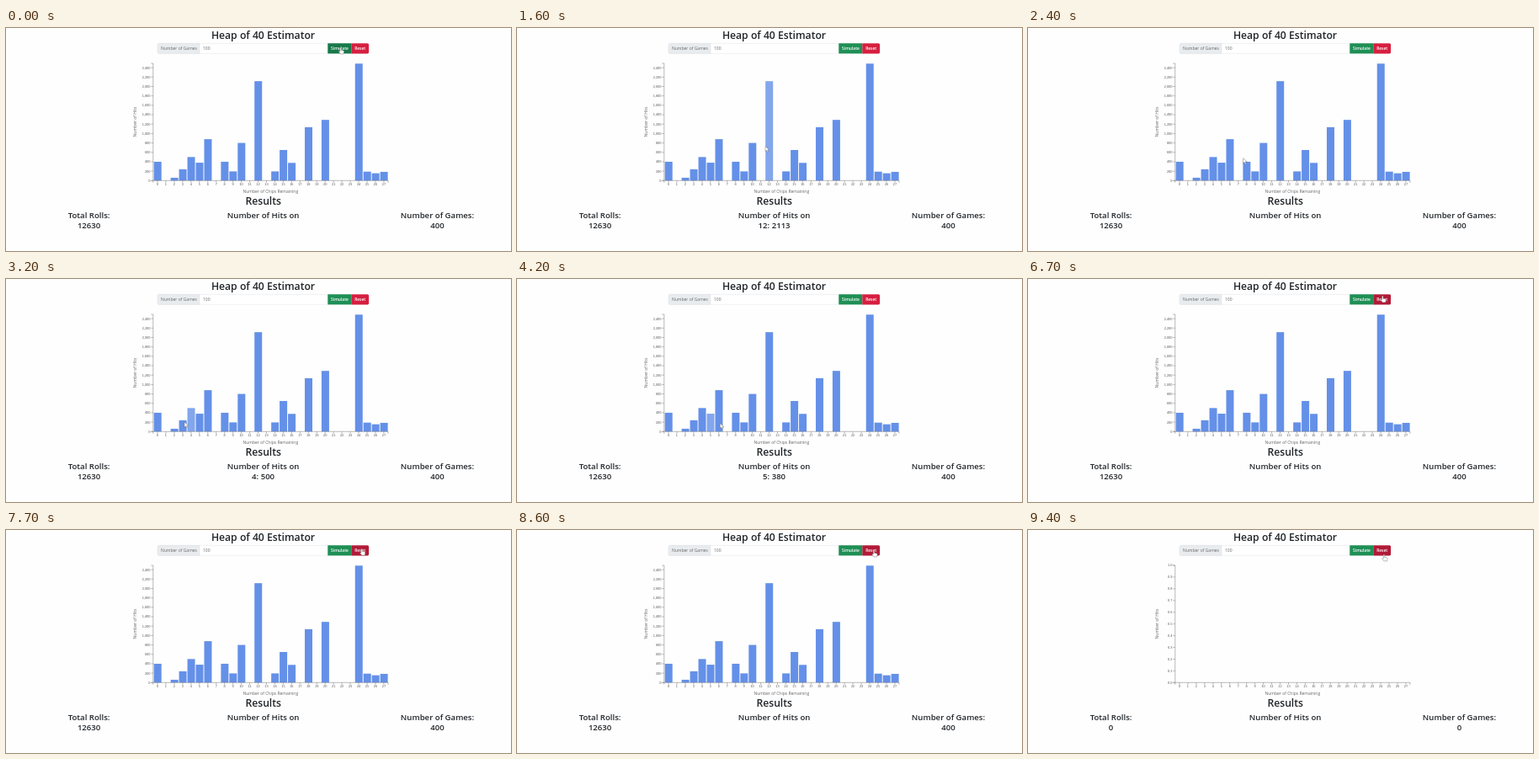
Recreate the animation shown at these times as an HTML page. Size 600 by 265 pixels, loop 9.5 s.

```html
<!DOCTYPE html>
<html lang="en">
<head>
<meta charset="utf-8">
<title>Dice chart</title>
<style>
  html, body { margin: 0; width: 100%; height: 100%; overflow: hidden; background: #fefefe; }
  svg { display: block; width: 600px; height: 265px; font-family: "Open Sans", "Noto Sans", sans-serif; }
  text { text-anchor: middle; fill: #212529; }
  .h2 { font-size: 12.2px; font-weight: 600; }
  .h4 { font-size: 9.6px; font-weight: 600; }
  .form { font-size: 5px; text-anchor: start; fill: #666; }
  .btn { font-size: 4.9px; font-weight: 600; fill: #fff; }
  .label { font-size: 5px; fill: #666; }
  .tick text { font: 3.9px "Liberation Sans", sans-serif; fill: #555; }
  .tick .y { text-anchor: end; }
  .axis { fill: none; stroke: #666; stroke-width: .45; }
  .bar { fill: #6490e8; }
  .bar.on { fill: #83a6ec; }
  .field { stroke: #d8dce1; stroke-width: .4; }
  #simulate { fill: #1f8f55; }
  #simulate.on { fill: #17794a; }
  #reset { fill: #d61f40; }
  #reset.on { fill: #b21a38; }
  .cursor { fill: #fff; stroke: #666; stroke-width: .45; stroke-linejoin: round; }
</style>
</head>
<body>
<svg viewBox="0 0 600 265">
  <text class="h2" x="305.5" y="13">Heap of 40 Estimator</text>

  <rect class="field" x="180.2" y="18.4" width="202" height="11.9" rx="1.5" fill="#fff"/>
  <path class="field" d="M230 18.4h-48.3q-1.5 0-1.5 1.5v8.9q0 1.5 1.5 1.5h48.3z" fill="#e9ecef"/>
  <text class="form" x="184" y="26.2">Number of Games</text>
  <text class="form" x="234" y="26.2">100</text>
  <rect id="simulate" x="382.3" y="18.2" width="28" height="12.2"/>
  <path id="reset" d="M410.3 18.2h19.2q1.6 0 1.6 1.6v9q0 1.6-1.6 1.6h-19.2z"/>
  <text class="btn" x="396.5" y="26.2">Simulate</text>
  <text class="btn" x="420.7" y="26.2">Reset</text>

  <g id="bars"></g>
  <path class="axis" d="M172.3 42h2.5v139.3h-2.5M174.8 183.8v-2.5h279.2v2.5"/>
  <g class="tick" id="xTicks"></g>
  <g class="tick" id="fullTicks"></g>
  <g class="tick" id="emptyTicks"></g>
  <text class="label" x="314.3" y="195.6">Number of Chips Remaining</text>
  <text class="label" transform="translate(155.4 111.5) rotate(-90)">Number of Hits</text>

  <text class="h2" x="305.7" y="210.3">Results</text>
  <text class="h4" x="98.6" y="225.6">Total Rolls:</text>
  <text class="h4" x="98.6" y="238" id="rolls"></text>
  <text class="h4" x="305.6" y="225.6">Number of Hits on</text>
  <text class="h4" x="305.6" y="238" id="hit"></text>
  <text class="h4" x="512.5" y="225.6">Number of Games:</text>
  <text class="h4" x="512.5" y="238" id="games"></text>

  <path class="cursor" id="arrow" d="M0 0v6.2l1.5-1.4 1 2.3 1.1-.5-1-2.2h2z"/>
  <path class="cursor" id="hand" d="M-.7 .6q.7-1 1.4 0v2.6l2.6.6q.9.3.8 1.3l-.5 2.8h-3.7l-2.1-2.7q0-1 1.5-.3z"/>
</svg>
<script>
const LOOP = 9500, STEP = 100, RESET_AT = 8700;
const BASE = 181.3, TOP = 42, LEFT = 180, PITCH = 9.96, UNIT = 0.0559;

// Chart data: chips remaining -> hits
const hits = {
  0: 400, 2: 60, 3: 240, 4: 500, 5: 380, 6: 880, 8: 400, 9: 195, 10: 800, 12: 2113,
  14: 195, 15: 650, 16: 376, 18: 1135, 20: 1290, 24: 2486, 25: 190, 26: 155, 27: 185
};

// Pointer stops: time, x, y
const path = [
  [0, 397.5, 23], [900, 378, 125], [1500, 299, 139], [1900, 283, 145],
  [3200, 212, 170], [3700, 179, 171], [5000, 341, 172], [5800, 400, 183],
  [6200, 419, 120], [6500, 421, 19.5], [8600, 424, 24], [9400, 423, 29]
];

const $ = id => document.getElementById(id);

function add(parent, tag, attrs, text = "") {
  const el = document.createElementNS("http://www.w3.org/2000/svg", tag);
  for (const key in attrs) el.setAttribute(key, attrs[key]);
  el.textContent = text;
  parent.append(el);
  return el;
}

function yTick(group, y, text) {
  add(group, "path", { class: "axis", d: `M172.3 ${y}h2.5` });
  add(group, "text", { class: "y", x: 171.4, y: y + 1.4 }, text);
}

const bars = {};
for (let i = 0; i < 28; i++) {
  const x = LEFT + i * PITCH;
  add($("xTicks"), "path", { class: "axis", d: `M${x} ${BASE}v2.5` });
  add($("xTicks"), "text", { x, y: 187 }, i);
  if (hits[i]) {
    const height = hits[i] * UNIT;
    bars[i] = add($("bars"), "rect", { class: "bar", x: x - 4.3, y: BASE - height, width: 9, height });
  }
}
for (let v = 0; v <= 2400; v += 200) yTick($("fullTicks"), BASE - v * UNIT, v.toLocaleString("en-US"));
for (let i = 0; i <= 10; i++) yTick($("emptyTicks"), BASE - i * (BASE - TOP) / 10, (i / 10).toFixed(1));

function tipAt(time) {
  const next = path.findIndex(p => p[0] > time);
  if (next < 0) return path[path.length - 1].slice(1);
  const [t0, x0, y0] = path[next - 1], [t1, x1, y1] = path[next];
  const k = (time - t0) / (t1 - t0);
  return [x0 + (x1 - x0) * k, y0 + (y1 - y0) * k];
}

function barUnder(x, y) {
  const i = Math.round((x - LEFT) / PITCH);
  return hits[i] && y < BASE && y > BASE - hits[i] * UNIT ? i : -1;
}

const show = (el, on) => el.setAttribute("visibility", on ? "visible" : "hidden");

function draw(time) {
  const cleared = time >= RESET_AT;
  const [x, y] = tipAt(time);
  // Hover styling trails the pointer by one step
  const [hx, hy] = tipAt(Math.max(0, time - STEP));
  const hovered = cleared ? -1 : barUnder(hx, hy);
  const onForm = hy > 18.2 && hy < 30.4;
  const onSimulate = onForm && hx > 382.3 && hx < 410.3;
  const onReset = onForm && hx >= 410.3 && hx < 431.1;

  for (const i in bars) bars[i].classList.toggle("on", +i === hovered);
  $("simulate").classList.toggle("on", onSimulate);
  $("reset").classList.toggle("on", onReset);
  show($("bars"), !cleared);
  show($("fullTicks"), !cleared);
  show($("emptyTicks"), cleared);
  $("rolls").textContent = cleared ? "0" : "12630";
  $("games").textContent = cleared ? "0" : "400";
  $("hit").textContent = hovered < 0 ? "" : `${hovered}: ${hits[hovered]}`;

  const pointing = onSimulate || onReset;
  show($("hand"), pointing);
  show($("arrow"), !pointing);
  $(pointing ? "hand" : "arrow").setAttribute("transform", `translate(${x} ${y})`);
}

const start = performance.now();
function frame() {
  const time = (performance.now() - start) % LOOP;
  draw(Math.floor(time / STEP) * STEP);
  requestAnimationFrame(frame);
}
frame();
</script>
</body>
</html>
```
